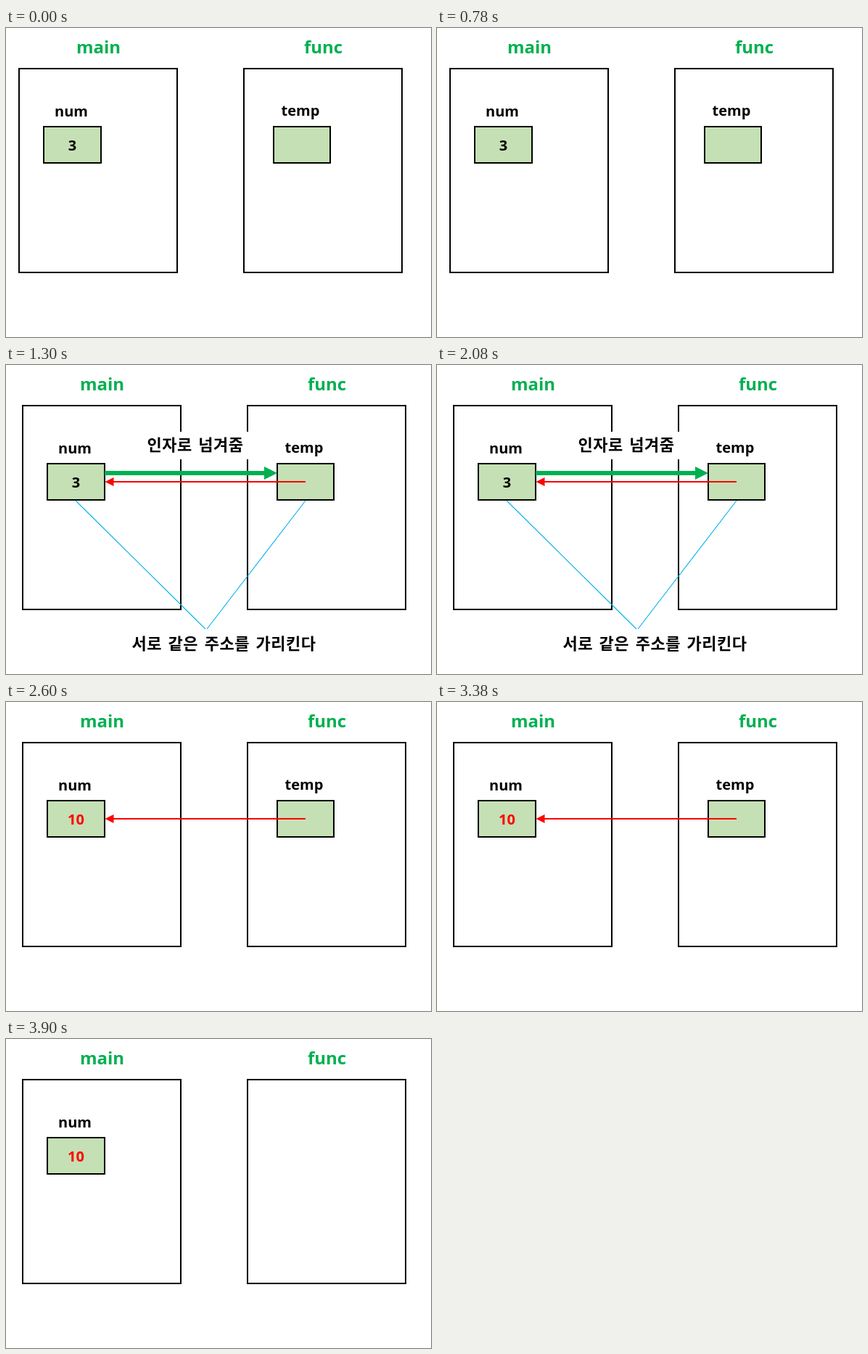
Animation of 586x426 px, one loop 5.2 s. Source, as an HTML page:

```html
<!DOCTYPE html>
<html lang="ko">
<head>
<meta charset="utf-8">
<title>Call by reference</title>
<style>
  html, body { margin: 0; width: 100%; height: 100%; overflow: hidden; background: #fff; }
  svg { display: block; }
  text { font: 700 20px "Open Sans", "Noto Sans", sans-serif; text-anchor: middle; }
  .title { font-size: 24px; fill: #00b050; }
  .note {
    font: 700 22px "Noto Sans CJK KR", "Noto Sans CJK", "Noto Sans CJK JP", sans-serif;
    letter-spacing: .5px; word-spacing: 2px;
  }
  .frame, .cell { fill: none; stroke: #000; stroke-width: 2; }
  .cell { fill: #c5e0b4; }
  .link { fill: none; stroke: #00b0f0; stroke-width: 1.1; }
  .red { fill: #f00; }
</style>
</head>
<body>
<svg width="586" height="426" viewBox="0 0 586 426">
  <g id="stage">
    <text class="title" x="132.5" y="35">main</text>
    <text class="title" x="442.5" y="35">func</text>
    <rect class="frame" x="23" y="56" width="218" height="281"/>
    <rect class="frame" x="333" y="56" width="218" height="281"/>

    <rect data-on="0100" x="182" y="92" width="156" height="38" fill="#fff"/>

    <text x="95" y="122">num</text>
    <rect class="cell" x="57" y="136" width="79" height="50"/>
    <text data-on="1100" x="96.5" y="168.5">3</text>
    <text data-on="0011" class="red" x="96.5" y="168.5">10</text>

    <g data-on="1110">
      <text x="411" y="121">temp</text>
      <rect class="cell" x="374" y="136" width="78" height="50"/>
    </g>

    <g data-on="0100">
      <path class="link" d="M96 187L275 364M413 187L277 364"/>
      <path fill="#00b050" d="M136 146H356V140L374 149L356 158V152H136Z"/>
      <text class="note" x="261" y="118">인자로 넘겨줌</text>
      <text class="note" x="300.5" y="392">서로 같은 주소를 가리킨다</text>
    </g>

    <path data-on="0110" class="red" d="M413 160H148.500V155L136.500 161L148.500 167V162H413Z"/>
  </g>
</svg>
<script>
  const STEP = 1300;
  const timing = { duration: STEP * 4, iterations: Infinity };

  // Holds one value per step, with hard changes between steps.
  function play(el, prop, values) {
    const frames = [...values, values[3]].map((v, i) => ({
      [prop]: v, offset: i / 4, easing: 'step-end'
    }));
    el.animate(frames, timing);
  }

  for (const el of document.querySelectorAll('[data-on]')) {
    play(el, 'visibility', [...el.dataset.on].map(c => c === '1' ? 'visible' : 'hidden'));
  }
  play(document.getElementById('stage'), 'transform',
    [-5, 0, 0, 0].map(x => `translate(${x}px, 0px)`));
</script>
</body>
</html>
```
